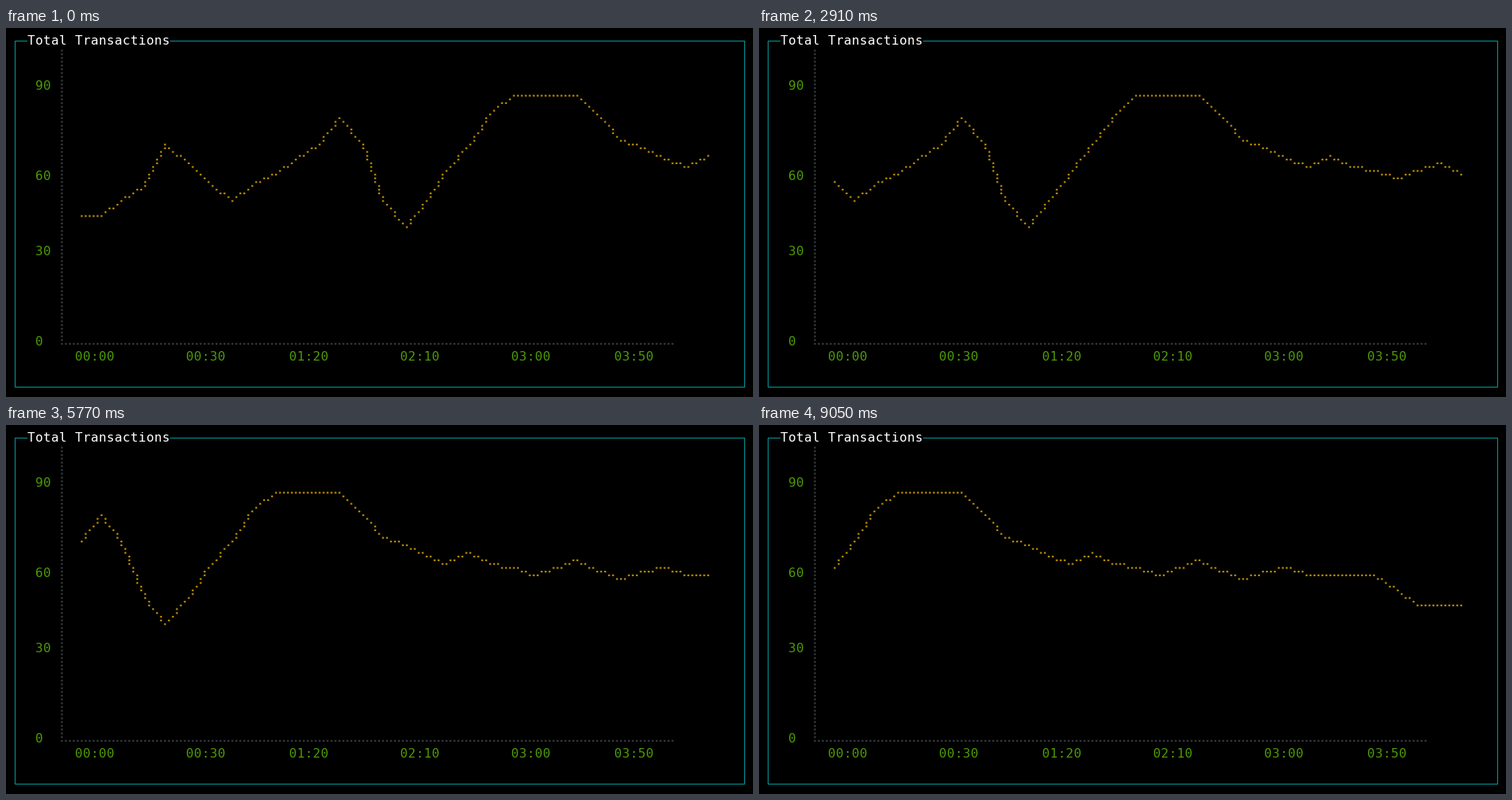
A matplotlib script that plays this animation: 942x466 px, repeating every 9.15 s.

```python
import numpy as np
import matplotlib.pyplot as plt
from matplotlib.animation import FuncAnimation
from matplotlib.patches import PathPatch
from matplotlib.path import Path

W, H, DPI = 942, 466, 64
PX = 72 / DPI                     # points per pixel
LOOP, STEP = 9150, 30             # ms
FIRST, EVERY = 60, 562            # ms, the window slides on by one sample
CELL_W, CELL_H = 10, 19           # terminal cell
LEFT, TOP = 7, 7                  # corner of the first cell
VISIBLE, PLOT_DOTS = 30, 164      # samples in the window, its width in dots

CYAN, GREEN, YELLOW, GRAY = "#06989a", "#4e9a06", "#c69800", "#3a3f41"

# Turning points of the series: sample, dot rows below the plateau
TURNS = [(0, 32), (1, 32), (3, 24), (4, 13), (7, 28), (11, 13), (12, 6),
         (13, 13), (14, 28), (15, 35), (19, 5), (20, 0), (23, 0), (25, 12),
         (28, 19), (29, 16), (30, 19.5), (42, 22.5), (44, 30), (46, 30)]

fig = plt.figure(figsize=(W / DPI, H / DPI), dpi=DPI, facecolor="black")
ax = fig.add_axes([0, 0, 1, 1])
ax.set_xlim(0, W)
ax.set_ylim(H, 0)
ax.axis("off")


def series():
    """Straight runs between the turns, with a ripple that fades in and out."""
    i = np.arange(TURNS[-1][0] + 1)
    ripple = 2.3 * np.cos(np.pi * (i - 36) / 2) * np.exp(-((i - 35) / 4) ** 4)
    return np.floor(np.interp(i, *zip(*TURNS)) + ripple + 0.5).astype(int)


def write(col, row, text, color):
    """Put text on the character grid, one glyph per cell."""
    y = TOP + row * CELL_H + 14
    for i, ch in enumerate(text):
        # Half a pixel left, so that rounding keeps each glyph's bearing
        ax.text(LEFT + (col + i) * CELL_W - 0.49, y, ch, color=color,
                family="DejaVu Sans Mono", size=16 * PX,
                ha="left", va="baseline")


def dots_path(cols, rows, size=2.2):
    """Path of small squares on the braille dot grid, each dot once."""
    cols, rows = np.unique(np.stack([cols, rows]), axis=1)
    x = 95.5 + 5 * cols
    y = 85.5 + CELL_H * (rows // 4) + 4.67 * (rows % 4)
    corner = np.array([[-1, -1], [1, -1], [1, 1], [-1, 1], [-1, -1]]) * size / 2
    verts = np.stack([x, y], axis=1)[:, None, :] + corner
    codes = [Path.MOVETO] + [Path.LINETO] * 3 + [Path.CLOSEPOLY]
    return Path(verts.reshape(-1, 2), np.tile(codes, len(x)))


def add_dots(path, color):
    return ax.add_patch(PathPatch(path, facecolor=color, edgecolor="none",
                                  lw=0, snap=False))


def segment(x0, y0, x1, y1):
    """Bresenham line between two dots."""
    n = max(abs(x1 - x0), abs(y1 - y0), 1)
    t = np.arange(n + 1)

    def walk(a, b):
        return a + np.sign(b - a) * ((2 * t * abs(b - a) + n) // (2 * n))

    return walk(x0, x1), walk(y0, y1)


def curve(samples):
    xs = np.arange(VISIBLE) * PLOT_DOTS // VISIBLE
    parts = [segment(*p) for p in zip(xs, samples, xs[1:], samples[1:])]
    return dots_path(*(np.concatenate(c) for c in zip(*parts)))


# Border, open behind the title
ax.plot([27, 11.5, 11.5, 931.5, 931.5, 207],
        [16.5, 16.5, 453.5, 453.5, 16.5, 16.5], color=CYAN, lw=PX,
        solid_joinstyle="miter", solid_capstyle="butt", snap=False)
write(2, 0, "Total Transactions", "white")

for row, label in [(3, "90"), (9, "60"), (14, "30"), (20, "0")]:
    write(3, row, label, GREEN)
for col, label in [(8, "00:00"), (22, "00:30"), (35, "01:20"),
                   (49, "02:10"), (63, "03:00"), (76, "03:50")]:
    write(col, 21, label, GREEN)

# Axes
up, along = np.arange(-12, 67), np.arange(-4, 150)
add_dots(dots_path(np.r_[np.full(len(up), -5), along],
                   np.r_[up, np.full(len(along), 66)]), GRAY)

data = series()
curves = [curve(data[s:s + VISIBLE]) for s in range(len(data) - VISIBLE + 1)]
line = add_dots(curves[0], YELLOW)


def update(frame):
    elapsed = (frame + 1) * STEP - FIRST
    line.set_path(curves[max(0, int(np.ceil(elapsed / EVERY)))])
    return [line]


anim = FuncAnimation(fig, update, frames=LOOP // STEP, interval=STEP,
                     repeat=True, repeat_delay=0, blit=False)
plt.show()
```
